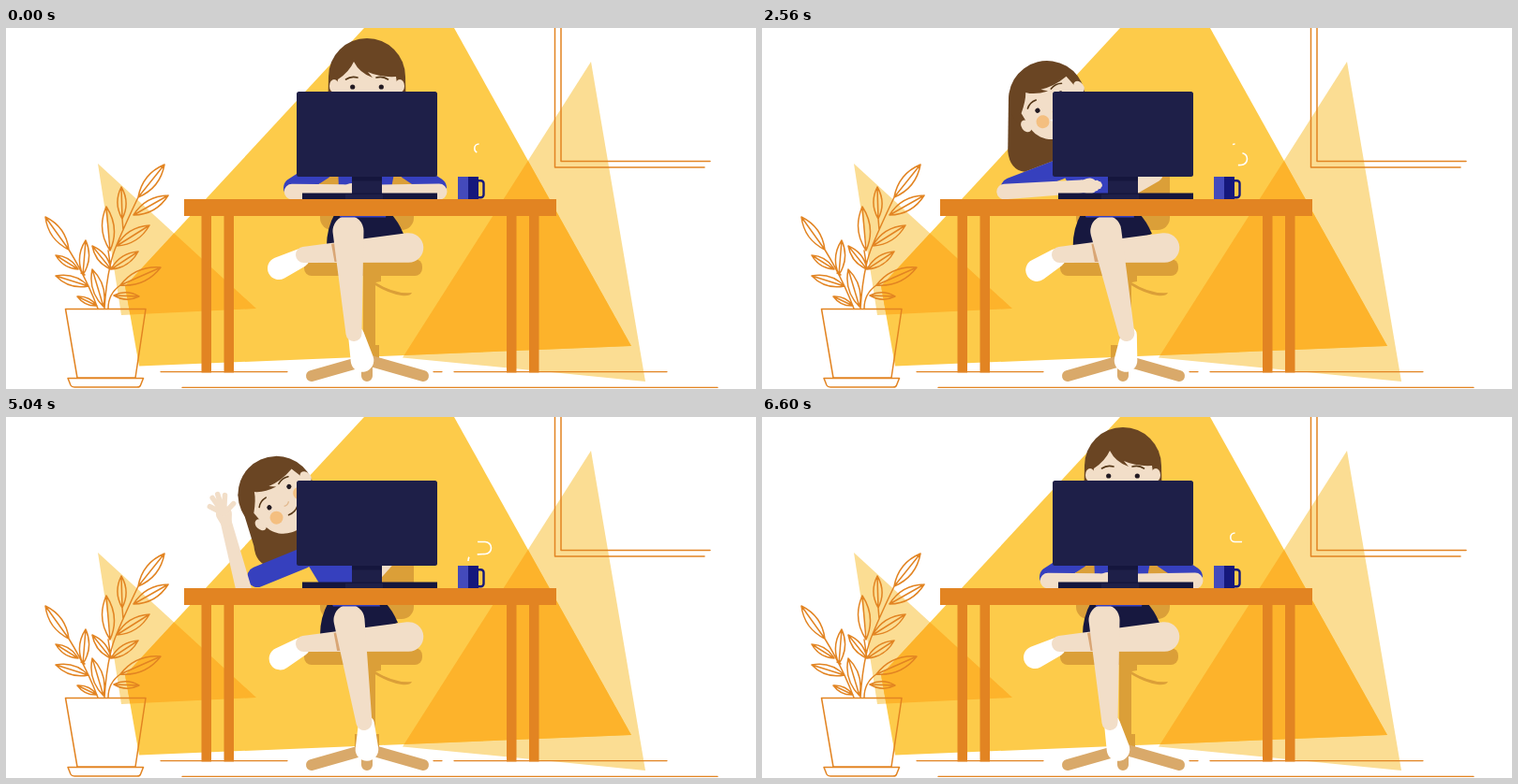
These frames come from a looping animation (800 by 386 pixels, 6640 ms). An HTML page:

```html
<!DOCTYPE html>
<html lang="en">
<head>
<meta charset="utf-8">
<title>Desk wave</title>
<style>
  html, body { margin: 0; width: 100%; height: 100%; overflow: hidden; background: #fff; }
  svg { display: block; width: 800px; height: 386px; }
  .line { fill: none; stroke: #e28422; stroke-width: 1.5; stroke-linejoin: round; stroke-linecap: round; }
  .floor { stroke-width: 1.3; }
  .wood { fill: #e28422; }
  .chair { fill: #db9f38; }
  .base { stroke: #d9a96a; stroke-width: 12; stroke-linecap: round; }
  .pale { fill: #fbdd93; }
  .deep { fill: #fdb32b; }
  .skin { fill: #f2dec8; }
  .shirt { fill: #3640be; }
  .hair { fill: #6a4523; }
  .navy { fill: #1e1f48; }
  .dark { fill: #15163d; }
  .shoe { fill: #fff; }
  .cheek { fill: #f4bf80; }
  .brow { fill: none; stroke: #553717; stroke-width: 1.6; stroke-linecap: round; }
  .fingers { fill: none; stroke: #f2dec8; stroke-width: 5.5; stroke-linecap: round; }
  .steam { fill: none; stroke: #fff; stroke-width: 1.6; }
</style>
</head>
<body>
<svg viewBox="0 0 800 386">
  <defs>
    <path id="bigTri" d="M382 0H478L667 340L142 361.500L127 276Z"/>
    <clipPath id="inBig"><use href="#bigTri"/></clipPath>
    <path id="leftTri" d="M98 145L267 300L123 307Z"/>
    <path id="rightTri" d="M624 36L682 378L423 352.500Z"/>
  </defs>

  <use href="#leftTri" class="pale"/>
  <use href="#rightTri" class="pale"/>
  <use href="#bigTri" fill="#fdcb4a"/>
  <g clip-path="url(#inBig)" class="deep">
    <use href="#leftTri"/>
    <use href="#rightTri"/>
  </g>

  <path class="line" d="M585.5 0V149H745M592 0V142.5H751"/>
  <path class="line floor" d="M165 367.6H300M456 367.6H465M478 367.6H705M188 384.4H759"/>
  <path class="line" d="M63.5 300.5H149L138 374H76ZM66 374.5H146.5L143.5 382Q143 384 140 384H73Q70 384 69 382Z"/>
  <path class="line" id="plant"/>

  <!-- chair -->
  <rect class="chair" x="335" y="140" width="100" height="76" rx="13"/>
  <rect class="chair" x="381" y="260" width="13" height="92"/>
  <rect class="chair" x="372" y="339" width="26" height="14"/>
  <path class="chair" d="M392 264H400V271L394 272Q415 285 433 283Q431 287 422 286Q408 284 392 274Z"/>
  <path class="base" d="M326 372L382 356M445 372L389 356M385 358V372"/>
  <rect class="chair" x="318" y="247" width="126" height="18" rx="8"/>

  <!-- legs -->
  <path id="skirt" fill="#17183f"/>
  <path id="sideShoe" class="shoe"/>
  <path id="thigh" class="skin"/>
  <path id="shade" fill="#d9a675"/>
  <path id="shoe" class="shoe"/>
  <path id="shin" class="skin"/>

  <!-- upper body -->
  <path id="backHair" class="hair"/>
  <path id="torso" class="shirt"/>
  <path id="rSleeve" class="shirt"/>
  <path id="rArm" class="skin"/>
  <g id="head">
    <circle class="hair" r="41"/>
    <ellipse class="skin" cx="-35" cy="10" rx="5" ry="7"/>
    <ellipse class="skin" cx="35" cy="10" rx="5" ry="7"/>
    <path id="face" class="skin"/>
    <g id="features">
      <circle class="cheek" cx="-18" cy="13" r="7"/>
      <circle class="cheek" cx="18" cy="13" r="7"/>
      <circle cx="-15.3" r="2.6" fill="#221a22"/>
      <circle cx="15.3" r="2.6" fill="#221a22"/>
      <path class="brow" d="M-22.5 -8Q-17 -12 -10 -10M10 -10Q17 -12 22.5 -8"/>
      <path d="M-3.5 10.5Q0 13 3.5 10.5" fill="none" stroke="#e2b88c" stroke-width="1.4"/>
      <path class="brow" d="M-7 20.5Q0 24 7 20.5"/>
      <path id="smile" class="shoe"/>
    </g>
  </g>
  <path id="sleeve" class="shirt"/>
  <path id="arm" class="skin"/>
  <path id="palm" class="skin"/>
  <path id="fingers" class="fingers"/>

  <!-- computer, mug and desk -->
  <rect class="navy" x="369" y="158" width="32" height="25"/>
  <rect class="dark" x="369" y="159" width="32" height="4.5"/>
  <rect class="dark" x="316" y="176.5" width="144" height="7"/>
  <rect class="navy" x="362" y="178" width="40" height="5"/>
  <rect class="navy" x="310" y="68" width="150" height="91" rx="2.5"/>
  <rect x="499" y="163.2" width="10.5" height="18" rx="3" fill="none" stroke="#15187c" stroke-width="2.4"/>
  <rect x="482" y="159" width="22" height="24" fill="#15187c"/>
  <rect x="482" y="159" width="11" height="24" fill="#444abb"/>
  <g id="steam"></g>
  <path class="wood" d="M190 183H587V201H568.5V368.5H558V201H544.5V368.5H534V201H243V368.5H232.5V201H219V368.5H208.5V201H190Z"/>
</svg>

<script>
const LOOP = 6640;
const $ = id => document.getElementById(id);
const draw = (id, d) => $(id).setAttribute('d', d);

// Plant: each leaf runs from base to tip
const leaves = [
  [141, 181, 169, 146], [136, 200, 173, 179], [124, 204, 123, 170],
  [111, 238, 107, 191], [118, 233, 153, 211], [112, 258, 141, 239],
  [122, 275, 165, 256], [115, 286, 142, 287], [67, 237, 42, 202],
  [82, 264, 85, 227], [112, 258, 92, 233], [77, 258, 53, 243],
  [88, 276, 53, 265], [104, 298, 92, 258], [97, 297, 76, 287]
];
function leaf([x, y, u, v]) {
  const mx = (x + u) / 2, my = (y + v) / 2;
  const nx = (y - v) * .27, ny = (u - x) * .27;
  return `M${x} ${y}Q${mx + nx} ${my + ny} ${u} ${v}Q${mx - nx} ${my - ny} ${x} ${y}L${u} ${v}`;
}
draw('plant', leaves.map(leaf).join('') +
  'M105 300Q108 255 118 232Q128 208 141 181M98 300Q86 268 67 237M109 300Q109 284 122 275' +
  'M112 258L109 238M124 204L125 216M80 262L84 264');

// Tapered limb between two circles
function limb(x1, y1, r1, x2, y2, r2) {
  const a = Math.atan2(y2 - y1, x2 - x1);
  const b = Math.acos((r1 - r2) / Math.hypot(x2 - x1, y2 - y1));
  const at = (x, y, r, k) => `${x + r * Math.cos(k)} ${y + r * Math.sin(k)}`;
  const wide = b > Math.PI / 2 ? 1 : 0;
  return `M${at(x1, y1, r1, a + b)}L${at(x2, y2, r2, a + b)}` +
    `A${r2} ${r2} 0 ${wide} 0 ${at(x2, y2, r2, a - b)}L${at(x1, y1, r1, a - b)}` +
    `A${r1} ${r1} 0 ${1 - wide} 0 ${at(x1, y1, r1, a + b)}Z`;
}

// Poses: c head, h hair end, s shoulder, e sleeve end, f forearm, w wrist; r* right arm
const work = {
  cx: 385, cy: 52, rot: 0, fy: 11, hx: 343, hy: 115, hw: 84, smile: 0, wave: 0,
  sx: 338, sy: 151, ex: 307, ey: 171, fx: 305, fy2: 175, wx: 360, wy: 174.5,
  rsx: 429, rsy: 151, rex: 459, rey: 171, rfx: 462, rfy: 175, rwx: 398, rwy: 174.5,
  tl: 354, tr: 416, skl: 342, skr: 424, knee: 365, ankle: 371, toe: 380
};
const peek = {
  ...work, cx: 370, cy: 51, rot: -4, fy: 0, hx: 329,
  sx: 327, ex: 296, fx: 295, rsx: 424, rex: 452, rfx: 455,
  tl: 347, tr: 420, skl: 337, skr: 419, knee: 366, ankle: 382, toe: 385
};
const lean = {
  ...work, cx: 283, cy: 84, rot: -47, fy: 5, hx: 241, hy: 153, hw: 66, smile: 1,
  sx: 315, sy: 151, ex: 256, ey: 171, fx: 247, fy2: 175, wx: 334, wy: 168,
  rsx: 375, rsy: 140, rex: 400, rey: 145, rfx: 408, rfy: 150, rwx: 389, rwy: 174,
  tl: 305, tr: 375, skl: 330, skr: 415, knee: 367, ankle: 391, toe: 389
};
const greet = { ...lean, ex: 268, ey: 171, sx: 317, fx: 253, fy2: 183, wx: 234, wy: 112, wave: 1 };
const leave = {
  ...greet, cx: 288, cy: 83, fy: 4, hx: 264, hy: 150, smile: 0,
  tl: 314, tr: 380, skl: 335, skr: 418, knee: 366, ankle: 382, toe: 385
};

const smooth = k => k * k * (3 - 2 * k);
const easeIn = k => k * k;
const easeOut = k => k * (2 - k);
const keys = [
  [0, work], [1400, work], [2060, peek], [2180, peek], [2740, lean], [3440, lean],
  [3860, greet], [4820, greet], [5040, leave, easeIn],
  [5480, { ...work, cy: 53 }, easeOut], [5780, { ...work, cy: 49, fy: 7 }],
  [6300, work], [LOOP, work]
];

function poseAt(t) {
  let i = 1;
  while (t > keys[i][0]) i++;
  const [t0, a] = keys[i - 1], [t1, b, ease = smooth] = keys[i];
  const k = ease((t - t0) / (t1 - t0)), p = {};
  for (const n in a) p[n] = a[n] + (b[n] - a[n]) * k;
  return p;
}

// Steam strokes: times at which head and tail set off
const puffs = [[-1600, -1180], [670, 1155], [1620, 2120], [3880, 4720], [4945, 5650]];
const trail = 'M493 154Q493 147 500 147L511 146.5A6.5 6.5 0 0 0 511 133.5H504.5A4.7 4.7 0 0 1 504.5 124';
const puffPaths = puffs.map(() => {
  const p = document.createElementNS('http://www.w3.org/2000/svg', 'path');
  p.setAttribute('class', 'steam');
  p.setAttribute('d', trail);
  return $('steam').appendChild(p);
});
const trailLength = puffPaths[0].getTotalLength();
function drawSteam(t) {
  const along = s => Math.max(0, Math.min(trailLength, (t - s) * .043));
  puffs.forEach(([start, end], i) => {
    const head = along(start), tail = along(end), el = puffPaths[i];
    el.style.display = head - tail > .1 ? '' : 'none';
    el.setAttribute('stroke-dasharray', `0 ${tail} ${head - tail} 200`);
  });
}

// Fingers: angle from the forearm and reach
const fingers = [[-48, 17], [-21, 21], [-3, 22], [18, 20], [58, 15]];

function drawHand(p, wx, wy) {
  const a = Math.atan2(wy - p.fy2, wx - p.fx);
  const px = wx + 9 * Math.cos(a), py = wy + 9 * Math.sin(a);
  const spread = .4 + .6 * p.wave, reach = .5 + .5 * p.wave;
  draw('palm', limb(wx, wy, 6, px, py, 8.5));
  draw('fingers', fingers.map(([deg, len]) => {
    const k = a + deg * spread * Math.PI / 180;
    return `M${px} ${py}L${px + len * reach * Math.cos(k)} ${py + len * reach * Math.sin(k)}`;
  }).join(''));
}

function drawLegs(p, t) {
  const bob = 2 * Math.sin(Math.PI * t / LOOP);
  const s = p.knee - 365 + (p.ankle - 371) * .15;
  draw('skirt', `M${p.skl + 9} 198Q${p.skl} 214 ${p.skl} 233L395 228L${p.skr} 220Q${p.skr - 6} 206 ${p.skr - 14} 198Z`);
  draw('sideShoe', limb(314, 246, 10, 291 + bob * 1.2, 257 + bob, 12));
  draw('thigh', limb(429.5, 235, 15.8, 317.5, 242.5, 8.5));
  draw('shade', `M${347 + s} 231L${362 + s} 228V250H${350.5 + s}Z`);
  draw('shoe', limb(p.ankle + 2.5, 328, 8.5, p.toe, 355.5, 12.3));
  draw('shin', limb(p.knee, 217, 16.5, p.ankle, 326.5, 8.5));
}

function drawHead(p) {
  const f = p.fy, tip = -21 + f * .45, line = f - 12;
  $('head').setAttribute('transform', `translate(${p.cx} ${p.cy}) rotate(${p.rot})`);
  $('features').setAttribute('transform', `translate(0 ${f})`);
  draw('face', `M-33 15L-31 ${f - 8}Q-19 ${f - 16} -14 ${tip}Q-8 ${line - 3} 6 ${line + 2}L1 ${line - 4}` +
    `Q14 ${line + 2} 31 ${line + 1}L33 15C32 54 -32 54 -33 15Z`);
  draw('smile', `M-11 16Q0 21 11 16Q${9 * p.smile} ${16 + 12 * p.smile} 0 ${20 + 8 * p.smile}Q${-9 * p.smile} ${16 + 12 * p.smile} -11 16Z`);
  $('smile').style.opacity = p.smile;
  draw('backHair', `M${p.cx - 41} ${p.cy}L${p.hx} ${p.hy - 12}Q${p.hx + 2} ${p.hy + 8} ${p.hx + 18} ${p.hy + 10}` +
    `L${p.hx + p.hw} ${p.hy - 10}L${p.cx + 41} ${p.cy}Z`);
}

function render(t) {
  const p = poseAt(t);
  const swing = p.wave * Math.sin(2 * Math.PI * (t - 5040) / 620);
  const wx = p.wx + 12 * swing, wy = p.wy - 3 * swing;
  drawLegs(p, t);
  drawHead(p);
  draw('torso', `M${p.tl} 145H${p.tr}L${p.skr - 19} 202.5H${p.skl + 14}Z`);
  draw('rSleeve', limb(p.rsx, p.rsy, 11, p.rex, p.rey, 11));
  draw('rArm', limb(p.rfx, p.rfy, 8.5, p.rwx, p.rwy, 7));
  draw('sleeve', limb(p.sx, p.sy, 11, p.ex, p.ey, 11));
  draw('arm', limb(p.fx, p.fy2, 8.3, wx, wy, 7.2 - 1.2 * p.wave));
  drawHand(p, wx, wy);
  drawSteam(t);
}

function tick() {
  render(performance.now() % LOOP);
  requestAnimationFrame(tick);
}
tick();
</script>
</body>
</html>
```
